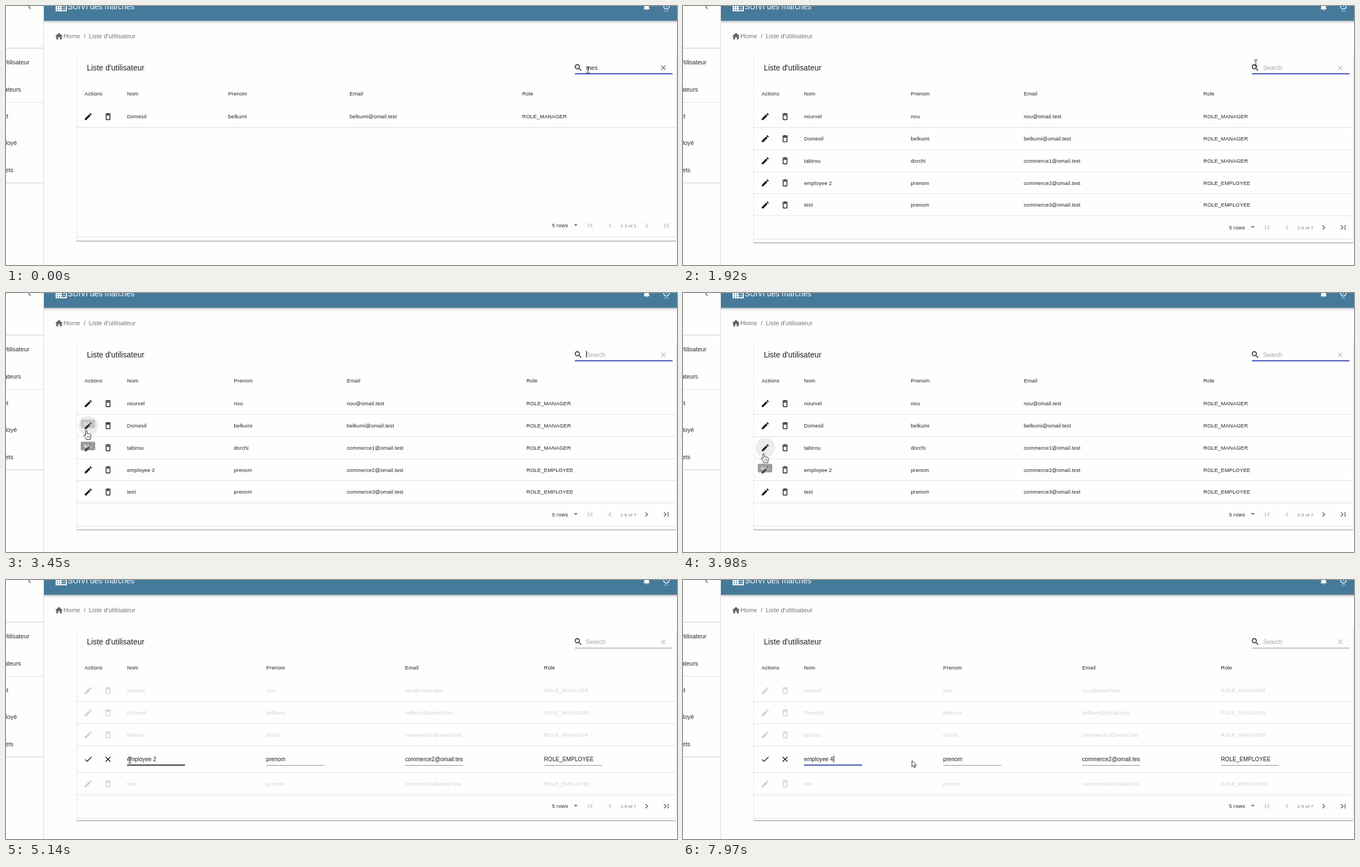
Recreate the animation shown at these times as an HTML page. Size 1203 by 466 pixels, loop 8 s.

```html
<!DOCTYPE html>
<html lang="fr">
<head>
<meta charset="utf-8">
<title>Liste d'utilisateur</title>
<style>
  html, body { margin: 0; width: 100%; height: 100%; overflow: hidden; background: #fefefe; }
  svg { display: block; font-family: "Liberation Sans", Arial, sans-serif; }
  text { white-space: pre; }
  .cell { font-size: 9.4px; letter-spacing: .15px; fill: #212121; }
  .field { font-size: 10.15px; fill: #1c1c1c; }
  .crumb { font-size: 11.25px; fill: #757575; }
  .menu { font-size: 10.9px; fill: #2b2b2b; text-anchor: end; }
  .count { font-size: 8px; letter-spacing: .2px; fill: #757575; }
  .search { font-size: 10.9px; }
</style>
</head>
<body>
<svg id="stage" width="1203" height="466" viewBox="0 0 1203 466"></svg>
<script>
const LOOP = 8000;
const ICONS = {
  edit: 'M3 17.25V21h3.75L17.81 9.94l-3.75-3.75L3 17.25zM20.71 7.04c.39-.39.39-1.02 0-1.41l-2.34-2.34c-.39-.39-1.02-.39-1.41 0l-1.83 1.83 3.75 3.75 1.83-1.83z',
  bin: 'M6 19c0 1.1.9 2 2 2h8c1.1 0 2-.9 2-2V7H6v12zM8 9h8v10H8V9zm7.5-5l-1-1h-5l-1 1H5v2h14V4z',
  check: 'M9 16.17L4.83 12l-1.42 1.41L9 19 21 7l-1.41-1.41z',
  clear: 'M19 6.41L17.59 5 12 10.59 6.41 5 5 6.41 10.59 12 5 17.59 6.41 19 12 13.41 17.59 19 19 17.59 13.41 12z',
  search: 'M15.5 14h-.79l-.28-.27C15.41 12.59 16 11.11 16 9.5 16 5.91 13.09 3 9.5 3S3 5.91 3 9.5 5.91 16 9.5 16c1.61 0 3.09-.59 4.23-1.57l.27.28v.79l5 4.99L20.49 19l-4.99-5zm-6 0C7.01 14 5 11.99 5 9.5S7.01 5 9.5 5 14 7.01 14 9.5 11.99 14 9.5 14z',
  left: 'M15.41 7.41L14 6l-6 6 6 6 1.41-1.41L10.83 12z',
  right: 'M10 6L8.59 7.41 13.17 12l-4.58 4.59L10 18l6-6z',
  first: 'M18.41 16.59L13.82 12l4.59-4.59L17 6l-6 6 6 6zM6 6h2v12H6z',
  last: 'M5.59 7.41L10.18 12l-4.59 4.59L7 18l6-6-6-6zM16 6h2v12h-2z',
  drop: 'M7 10l5 5 5-5z',
  home: 'M10 20v-6h4v6h5v-8h3L12 3 2 12h3v8z',
  building: 'M12 7V3H2v18h20V7H12zM6 19H4v-2h2v2zm0-4H4v-2h2v2zm0-4H4V9h2v2zm0-4H4V5h2v2zm4 12H8v-2h2v2zm0-4H8v-2h2v2zm0-4H8V9h2v2zm0-4H8V5h2v2zm10 12h-8v-2h2v-2h-2v-2h2v-2h-2V9h8v10zm-2-8h-2v2h2v-2zm0 4h-2v2h2v-2z',
  bell: 'M12 22c1.1 0 2-.9 2-2h-4c0 1.1.89 2 2 2zm6-6v-5c0-3.07-1.64-5.64-4.5-6.32V4c0-.83-.67-1.5-1.5-1.5s-1.5.67-1.5 1.5v.68C7.63 5.36 6 7.92 6 11v5l-2 2v1h16v-1l-2-2z',
  power: 'M7 24h2v-2H7v2zm4 0h2v-2h-2v2zm2-22h-2v10h2V2zm3.56 2.44l-1.45 1.45C16.84 6.94 18 8.83 18 11c0 3.31-2.69 6-6 6s-6-2.69-6-6c0-2.17 1.16-4.06 2.88-5.12L7.44 4.44C5.36 5.88 4 8.28 4 11c0 4.42 3.58 8 8 8s8-3.58 8-8c0-2.72-1.36-5.12-3.44-6.56zM15 24h2v-2h-2v2z'
};
const HEADS = ['Nom', 'Prenom', 'Email', 'Role'];
const USERS = [
  ['nourvel', 'nou', 'nou@omail.test', 'ROLE_MANAGER'],
  ['Domesil', 'belkumi', 'belkumi@omail.test', 'ROLE_MANAGER'],
  ['tabirou', 'dorchi', 'commerce1@omail.test', 'ROLE_MANAGER'],
  ['employee 2', 'prenom', 'commerce2@omail.test', 'ROLE_EMPLOYEE'],
  ['test', 'prenom', 'commerce3@omail.test', 'ROLE_EMPLOYEE']
];
const ROW_Y = [199, 238.8, 278.5, 318.2, 358];
const EDIT_COLS = [217, 466.5, 715.5, 964.5];

const text = (x, y, s, cls, extra = '') => `<text x="${x}" y="${y}" class="${cls}" ${extra}>${s}</text>`;
const rect = (x, y, w, h, fill, extra = '') =>
  `<rect x="${x}" y="${y}" width="${w}" height="${h}" fill="${fill}" ${extra}/>`;
const icon = (name, x, y, size = 16.6, fill = '#1a1a1a', extra = '') =>
  `<path d="${ICONS[name]}" fill="${fill}" transform="translate(${x - size / 2} ${y - size / 2}) scale(${size / 24})" ${extra}/>`;
const rule = y => rect(127, y, 1075, 1, '#e0e0e0');

const header = cols => text(141, 161.2, 'Actions', 'cell') +
  HEADS.map((h, i) => text(cols[i], 161.2, h, 'cell')).join('');

const userRow = (user, y, cols) => icon('edit', 147.5, y) + icon('bin', 183, y) +
  user.map((s, i) => text(cols[i], y + 3.4, s, 'cell')).join('');

function pager(y, label, more) {
  const next = more ? '#5f5f5f' : '#bdbdbd';
  return text(979, y + 3.4, '5 rows', 'cell') + icon('drop', 1021.5, y - 1, 16.6, '#757575') +
    icon('first', 1047.5, y, 16.6, '#bdbdbd') + icon('left', 1083, y, 16.6, '#bdbdbd') +
    text(1101.5, y + 3.2, label, 'count') + icon('right', 1148.5, y, 16.6, next) + icon('last', 1183.5, y, 16.6, next);
}

const cardFrame = (inner, bottom) => rect(126, 88, 1, bottom - 88, '#e6e6e6') + rect(1201, 88, 1, bottom - 88, '#e6e6e6') +
  rule(inner) + ['#bcbcbc', '#cfcfcf', '#ececec'].map((c, i) => rect(126.5, bottom + i, 1075, 1, c)).join('');

function filteredView() {
  const cols = [217, 398.5, 616, 925.5];
  return header(cols) + userRow(USERS[1], 199, cols) + rule(218) + pager(395, '1-1 of 1', false) + cardFrame(415, 422);
}

function fullView() {
  const cols = [217, 408.5, 611, 933];
  return header(cols) + USERS.map((u, i) => userRow(u, ROW_Y[i], cols)).join('') +
    [218, 258, 298, 337, 377].map(rule).join('') + pager(398.5, '1-5 of 7', true) + cardFrame(419, 425);
}

function editView() {
  const ys = [199, 238.8, 278.5, 0, 366.5];
  const others = USERS.map((u, i) => i === 3 ? '' : userRow(u, ys[i], EDIT_COLS)).join('');
  const fields = USERS[3].map((s, i) =>
    `<svg x="${EDIT_COLS[i]}" y="310" width="104" height="22">${text(0, 16, s, 'field', i ? '' : 'id="nom"')}</svg>` +
    rect(EDIT_COLS[i], 333, 104, 1, '#8e8e8e')).join('');
  return header(EDIT_COLS) + `<g id="others">${others}</g>` +
    icon('check', 147.5, 322.5, 16.6, '#111', 'id="check"') + icon('clear', 183, 322.5, 16.6, '#111') +
    rect(264, 316, 6.5, 12, '#c4c4c4', 'id="selection"') + fields +
    rect(217, 332, 104, 2, '#333', 'id="nomHover"') + rect(466.5, 332, 104, 2, '#333', 'id="prenomHover"') +
    rect(217, 332, 104, 2, '#3f51b5', 'id="nomFocus"') +
    [218, 258, 298, 346, 386].map(rule).join('') + pager(407, '1-5 of 7', true) + cardFrame(428, 432);
}

// Tooltips: label, centre x, row, start of fade in, end of fade out
const TIPS = [
  ['Delete', 182.5, 0, 2730, 3190], ['Edit', 147, 0, 2850, 3540], ['Edit', 147, 1, 3240, 3650],
  ['Edit', 147, 2, 3710, 4250], ['Edit', 147, 3, 4180, 4610]
];
const tip = ([label, x, row], i) => {
  const w = label === 'Edit' ? 26 : 35, y = ROW_Y[row] + 36.5;
  return `<g id="tip${i}">${rect(x - w / 2, y - 7.7, w, 15.4, '#616161', 'rx="2.7"')}` +
    `<text x="${x}" y="${y + 2.6}" font-size="7.4" font-weight="bold" fill="#fff" text-anchor="middle">${label}</text></g>`;
};

const stage = document.getElementById('stage');
stage.innerHTML = `
  <defs><linearGradient id="shade" x2="0" y2="1">
    <stop stop-opacity=".32"/><stop offset=".4" stop-opacity=".13"/><stop offset="1" stop-opacity="0"/>
  </linearGradient></defs>
  ${rect(0, 0, 1203, 466, '#fefefe')}
  ${rect(67, 0, 1, 466, '#dcdcdc')}${rect(68, 26, 1135, 6, 'url(#shade)')}${rect(68, 0, 1135, 26.5, '#467a9a')}
  ${rect(0, 75, 67, 1.5, '#dadada')}${rect(0, 173, 67, 1, '#e0e0e0')}${rect(0, 317.5, 67, 1.5, '#dadada')}
  ${icon('left', 42.5, 1.5, 16.6, '#666')}
  ${[[42, 105, 'Utilisateur'], [27, 153.5, 'Utilisateurs'], [4, 202.3, 'Projet'], [19.5, 250.3, 'Employé'], [13.3, 298.7, 'Projets']]
    .map(([x, y, s]) => text(x, y, s, 'menu')).join('')}
  ${icon('building', 99, .5, 24, '#fff')}${text(110.5, 6.3, 'SUIVI des marchés', '', 'font-size="13.9" fill="#fff"')}
  ${icon('bell', 1148.5, 1, 16.6, '#fff')}${icon('power', 1184, 1.5, 16.6, '#fff')}
  ${icon('home', 95, 54.5, 16.8, '#666')}
  ${text(103, 58, 'Home', 'crumb')}${text(139.5, 58, '/', 'crumb')}${text(148.5, 58, "Liste d'utilisateur", 'crumb')}
  ${text(145, 115.6, "Liste d'utilisateur", '', 'font-size="13.9" fill="#212121"')}
  ${icon('search', 1026, 111)}${icon('clear', 1178.5, 111, 15, '#6c6c6c', 'id="wipe"')}
  ${text(1040, 114.6, '', 'search', 'id="query"')}
  ${rect(1020, 122, 175, 1, '#8e8e8e')}${rect(1020, 121, 175, 2, '#3f51b5', 'id="searchFocus"')}
  <circle id="halo" r="17.6" fill="#ededed"/>
  <g id="filtered">${filteredView()}</g><g id="full">${fullView()}</g><g id="editing">${editView()}</g>
  ${rect(0, 0, 1, 12, '#111', 'id="caret"')}
  ${TIPS.map(tip).join('')}
  <g id="arrow"><path d="M.5.5v11.3l2.6-2.4 1.8 4 1.8-.8-1.8-3.9h3.6z" fill="#fff" stroke="#111" stroke-width=".9"/></g>
  <g id="hand"><path d="M-1.4 9.5V1.7a1.4 1.4 0 0 1 2.8 0V6.4c.8-.9 2.1-.6 2.5.3.8-.6 2-.4 2.4.6.9-.4 2 .1 2 1.2v3.2c0 1.5-.9 2.7-1 4.9H0C-.6 14-3 12-4.2 9.8c-.6-1.2 1-2 1.8-1.1z"
    fill="#fff" stroke="#111" stroke-width=".9"/><path d="M1.8 10v3.6M3.8 10v3.6M5.8 10v3.6" stroke="#111" stroke-width=".6"/></g>
  <g id="beam"><path d="M-3 .5h2.2l.8.7.8-.7h2.2M0 1.2v9.6M-3 11.5h2.2l.8-.7.8.7h2.2" fill="none" stroke="#222"/></g>`;

const el = {};
stage.querySelectorAll('[id]').forEach(node => el[node.id] = node);

// Pointer: time, x, y, shape, hovered control (e = edit, d = delete, then the row)
const POINTER = [
  [0, 1043.5, 109, 'beam'], [1920, 1027, 96.5, 'beam'], [2010, 960, 115, 'arrow'], [2100, 830, 148, 'arrow'],
  [2190, 680, 174, 'arrow'], [2280, 530, 190, 'arrow'], [2370, 410, 199, 'arrow'], [2460, 320, 204, 'arrow'],
  [2550, 250, 206, 'arrow'], [2640, 199, 206.5, 'arrow'], [2730, 183, 207, 'hand', 'd0'], [2820, 165, 209, 'hand', 'd0'],
  [2910, 150, 209.5, 'hand', 'e0'], [3000, 141.5, 209.5, 'hand', 'e0'], [3180, 142, 215, 'hand', 'e0'],
  [3270, 143, 235, 'hand', 'e1'], [3360, 143.5, 243, 'hand', 'e1'], [3450, 144, 247, 'hand', 'e1'],
  [3710, 144, 278, 'hand', 'e2'], [3800, 144.5, 284, 'hand', 'e2'], [3890, 144.5, 288, 'hand', 'e2'],
  [3980, 144.7, 288.8, 'hand', 'e2'], [4070, 145, 292, 'hand', 'e2'], [4160, 145.5, 302, 'hand', 'e3'],
  [4330, 146, 309, 'hand', 'e3'], [4510, 146.5, 311.3, 'hand', 'e3'], [4610, 146.5, 311.3, 'hand'],
  [4870, 152, 313, 'hand'], [4960, 168, 316, 'arrow'], [5050, 192, 318, 'arrow'], [5140, 222, 318, 'beam', 'nom'],
  [5240, 248, 318, 'beam', 'nom'], [5330, 264, 318, 'beam', 'nom'], [5600, 268, 318, 'beam'], [5690, 273, 318, 'beam'],
  [5870, 305, 319, 'beam'], [5960, 325, 322, 'arrow'], [6060, 331.5, 321.5, 'arrow'],
  [7350, 372, 318, 'arrow'], [7440, 432, 314, 'arrow'], [7530, 490, 312, 'beam', 'prenom'],
  [7620, 498, 313, 'beam', 'prenom'], [7700, 470, 316, 'beam', 'prenom'], [7790, 440, 320, 'arrow'],
  [7880, 420, 323, 'arrow'], [7970, 410, 324.5, 'arrow']
];
const QUERY = [[0, 'mes'], [280, 'me'], [360, 'm'], [540, '']];
const CARET_ON = [[90, 630], [1180, 1640], [2190, 2730], [3240, 3770], [4310, 4510], [5510, 5690], [7070, 7440], [7970, 8000]];

const within = (t, a, b) => t >= a && t < b;
const clamp = v => Math.max(0, Math.min(1, v));
const current = (steps, t) => steps.filter(s => s[0] <= t).pop();
const show = (node, on) => node.setAttribute('display', on ? 'inline' : 'none');
const place = (node, x, y) => node.setAttribute('transform', `translate(${x} ${y})`);
const setText = (node, s) => { if (node.textContent !== s) node.textContent = s; };

function drawPointer(t) {
  const [, x, y, shape, hover = ''] = current(POINTER, t);
  for (const name of ['arrow', 'hand', 'beam']) show(el[name], name === shape);
  place(el[shape], x, y);
  const button = /^[ed]\d$/.test(hover);
  show(el.halo, button);
  if (button) place(el.halo, hover[0] === 'e' ? 147.5 : 183, ROW_Y[hover[1]]);
  show(el.nomHover, hover === 'nom' && t < 5510);
  show(el.prenomHover, hover === 'prenom');
}

function drawSearch(t) {
  const query = current(QUERY, t)[1];
  setText(el.query, query || 'Search');
  el.query.setAttribute('fill', query ? '#222' : '#a3a3a3');
  el.wipe.setAttribute('fill', query ? '#6c6c6c' : '#bdbdbd');
  show(el.searchFocus, t < 4510);
  return query;
}

function drawEditing(t, tick) {
  el.others.setAttribute('opacity', 1 - .8 * clamp((tick - 4690) / 300));
  show(el.check, t >= 4780);
  show(el.selection, within(t, 5690, 6890));
  setText(el.nom, t < 6890 ? 'employee 2' : 'employee 4');
  const grow = t < 5510 ? 0 : t < 5600 ? .4 : t < 5690 ? .85 : 1;
  el.nomFocus.setAttribute('width', 104 * grow);
  el.nomFocus.setAttribute('x', 269 - 52 * grow);
}

function drawCaret(t, query) {
  show(el.caret, CARET_ON.some(([a, b]) => within(t, a, b)));
  if (t < 4610) place(el.caret, 1040 + (query ? Math.round(el.query.getComputedTextLength()) : 0), 104);
  else place(el.caret, t < 6890 ? 264 : 270, 316);
}

function draw(t) {
  const tick = Math.floor((t - 30) / 90) * 90 + 30;
  show(el.filtered, t < 810);
  show(el.full, within(t, 810, 4610));
  show(el.editing, t >= 4610);
  drawPointer(t);
  const query = drawSearch(t);
  drawEditing(t, tick);
  drawCaret(t, query);
  TIPS.forEach(([, , , start, end], i) =>
    el['tip' + i].setAttribute('opacity', .85 * clamp(Math.min(tick - start, end - tick) / 270)));
}

const began = performance.now();
function frame() {
  draw((performance.now() - began) % LOOP);
  requestAnimationFrame(frame);
}
frame();
</script>
</body>
</html>
```
